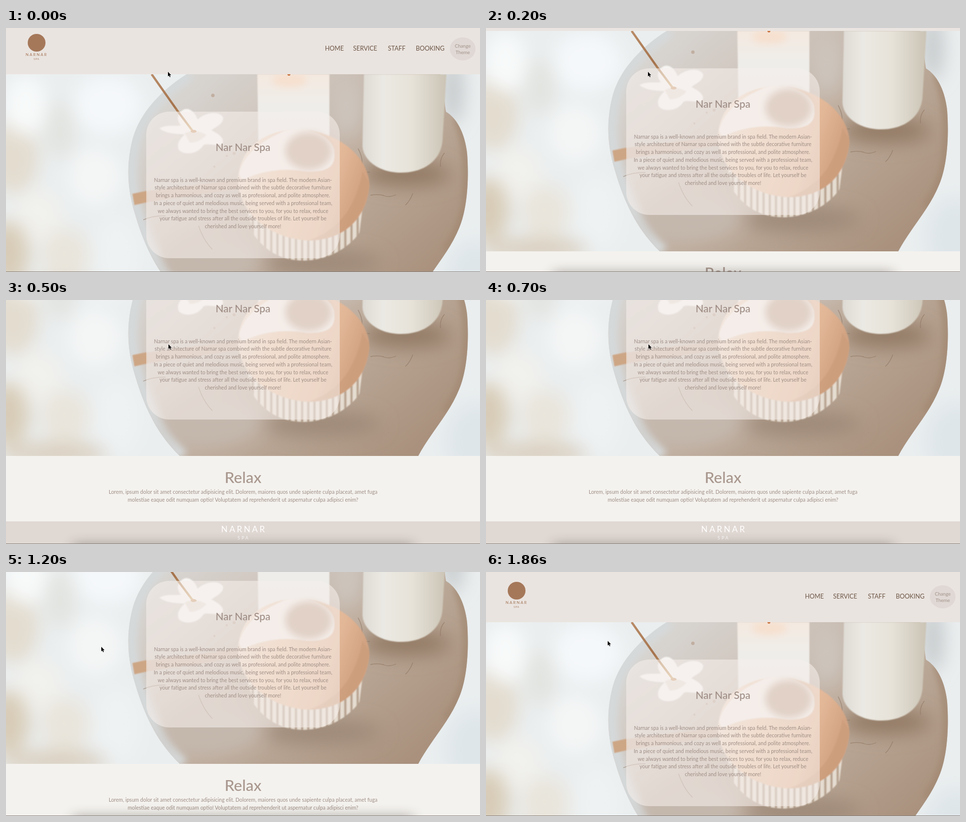
An HTML page that plays this animation: 960 by 496 pixels, repeating every 2020 ms.

```html
<!DOCTYPE html>
<html lang="en">
<head>
<meta charset="utf-8">
<title>Spa</title>
<style>
  html, body { margin: 0; width: 100%; height: 100%; overflow: hidden; background: #f4f2ee; }
  #stage { position: relative; width: 960px; height: 496px; overflow: hidden; font-family: Lato, "Open Sans", sans-serif; }
  #stage * { box-sizing: border-box; margin: 0; }
  #page { position: absolute; left: 0; top: 0; width: 960px; height: 760px; color: #9f8e86; }
  #page > * { position: absolute; white-space: nowrap; }
  header { left: 0; top: 0; width: 960px; height: 102px; background: #eae4e0; }
  header > * { position: absolute; line-height: 20px; }
  nav a { position: absolute; top: 40px; line-height: 20px; font-size: 12.4px; color: #6d5747; }
  .mark { left: 44px; top: 20px; width: 36px; height: 36px; border-radius: 50%; background: #a5785a; }
  .word { color: #a5785a; text-align: center; left: 22px; width: 80px; }
  .theme { left: 899px; top: 27px; width: 52px; height: 47px; border-radius: 50%; background: #e0d8d4; text-align: center; font-size: 9.7px; line-height: 13px; padding-top: 10.5px; color: #a3938b; }
  #hero { left: 0; top: 102px; }
  .card { left: 284px; top: 177.5px; width: 392px; height: 298px; border-radius: 47px; background: rgba(246, 240, 236, .57); }
  .mid { left: 0; width: 960px; text-align: center; }
  .copy { font-size: 10.5px; line-height: 15.7px; }
  h1 { top: 235px; font-size: 21px; line-height: 30px; font-weight: 500; }
  h2 { top: 573px; font-size: 31.5px; line-height: 40px; font-weight: 500; color: #a8978e; }
  footer { left: 0; top: 683px; width: 960px; height: 77px; background: #e0d8d3; }
  .foot { color: #fff; line-height: 20px; }
  #shade { position: absolute; left: 140px; top: 502px; width: 680px; height: 12px; box-shadow: 0 0 24px 4px rgba(50, 42, 38, .45); }
  #edge { position: absolute; left: 0; top: 495px; width: 960px; height: 1px; background: #88807b; }
  #cursor { position: absolute; left: 0; top: 0; overflow: visible; }
</style>
</head>
<body>
<div id="stage">
  <div id="page">
    <svg id="hero" width="960" height="448" viewBox="0 102 960 448">
      <defs>
        <filter id="soft" x="-60%" y="-60%" width="220%" height="220%"><feGaussianBlur stdDeviation="18"/></filter>
        <filter id="haze" x="-30%" y="-30%" width="160%" height="160%"><feGaussianBlur stdDeviation="7"/></filter>
        <filter id="fine"><feGaussianBlur stdDeviation="1"/></filter>
        <linearGradient id="wood" x1="0" y1="0" x2="1" y2=".75">
          <stop offset="0" stop-color="#dcdddb"/><stop offset=".3" stop-color="#d2cac3"/>
          <stop offset=".65" stop-color="#bcaa9a"/><stop offset="1" stop-color="#a9917d"/>
        </linearGradient>
        <linearGradient id="wax">
          <stop offset="0" stop-color="#dedbd4"/><stop offset=".25" stop-color="#ebe9e3"/>
          <stop offset=".6" stop-color="#e6e2d8"/><stop offset="1" stop-color="#cbc4b5"/>
        </linearGradient>
        <linearGradient id="glow" x2="0" y2="1">
          <stop offset="0" stop-color="#f4e9e0"/><stop offset=".35" stop-color="#efedea"/><stop offset="1" stop-color="#ebe9e6"/>
        </linearGradient>
        <linearGradient id="peach" y2=".3">
          <stop offset="0" stop-color="#efe1d6"/><stop offset=".4" stop-color="#eac8ac"/>
          <stop offset=".8" stop-color="#e2b797"/><stop offset="1" stop-color="#d2a382"/>
        </linearGradient>
        <linearGradient id="stick" gradientUnits="userSpaceOnUse" x1="295" y1="102" x2="380" y2="220">
          <stop offset="0" stop-color="#b98c68"/><stop offset=".55" stop-color="#a5734c"/><stop offset="1" stop-color="#d9b57e"/>
        </linearGradient>
        <pattern id="comb" width="12.5" height="80" patternUnits="userSpaceOnUse">
          <rect width="12.5" height="80" fill="#b7a28f"/><rect x="2" width="8" height="80" fill="#e6ddd1"/>
        </pattern>
        <clipPath id="tray"><path id="slab" d="M366 102C318 132 272 178 257 232C243 284 246 330 258 375C276 438 300 500 352 550H835C858 506 898 464 918 414C934 376 938 316 934 264C930 224 914 192 891 178L880 102Z"/></clipPath>
      </defs>
      <rect y="102" width="960" height="448" fill="#eaeeef"/>
      <g filter="url(#soft)">
        <ellipse cx="15" cy="270" rx="50" ry="75" fill="#e3dccf"/>
        <ellipse cx="110" cy="215" rx="32" ry="60" fill="#e2e4e0"/>
        <ellipse cx="40" cy="165" rx="42" ry="60" fill="#f8fafa"/>
        <ellipse cx="205" cy="165" rx="70" ry="60" fill="#f5f8fa"/>
        <ellipse cx="180" cy="310" rx="55" ry="60" fill="#f4f6f6"/>
        <ellipse cx="65" cy="390" rx="50" ry="55" fill="#f1f1ed"/>
        <ellipse cx="5" cy="465" rx="42" ry="65" fill="#d8ccb7"/>
        <ellipse cx="120" cy="470" rx="50" ry="55" fill="#e9e5dc"/>
        <ellipse cx="100" cy="545" rx="110" ry="22" fill="#d9cebd"/>
        <ellipse cx="225" cy="470" rx="50" ry="80" fill="#eef2f3"/>
        <ellipse cx="905" cy="135" rx="22" ry="70" fill="#c6cacc"/>
        <ellipse cx="950" cy="520" rx="60" ry="80" fill="#dfe6ea"/>
      </g>
      <use href="#slab" fill="url(#wood)"/>
      <g clip-path="url(#tray)">
        <path d="M372 102C322 135 276 180 262 235C250 285 252 330 264 375C282 438 306 500 358 550" fill="none" stroke="#d5d9da" stroke-width="26" filter="url(#haze)"/>
        <g filter="url(#soft)">
          <ellipse cx="810" cy="305" rx="90" ry="26" fill="#937a65"/>
          <ellipse cx="640" cy="485" rx="120" ry="26" fill="#9f8a79"/>
          <ellipse cx="420" cy="480" rx="100" ry="50" fill="#c4b8ad"/>
          <ellipse cx="690" cy="170" rx="30" ry="60" fill="#cdc5bd"/>
        </g>
        <path d="M912 190Q940 250 930 360Q926 410 890 460" fill="none" stroke="#a18872" stroke-width="12" filter="url(#haze)"/>
        <g fill="none" stroke="#8c7460" stroke-width="1.3" opacity=".65">
          <path d="M738 348q18 -3 28 1t24 -2M824 344q-6 16 -15 24M713 253q10 18 8 34t16 14M888 262q-10 12 -8 28M278 398q20 -9 45 -8M390 410q10 30 28 48"/>
        </g>
        <g fill="#b59a86" opacity=".6"><circle cx="419" cy="145" r="3.5"/><circle cx="462" cy="263" r="3"/><circle cx="447" cy="268" r="2"/><circle cx="485" cy="260" r="2"/><circle cx="422" cy="290" r="2"/></g>
      </g>
      <path d="M509 102H655V300H512Z" fill="url(#glow)" filter="url(#fine)"/>
      <ellipse cx="574" cy="114" rx="36" ry="14" fill="#f6e0cf" filter="url(#haze)"/>
      <circle cx="573" cy="102" r="3" fill="#c9733f"/>
      <path d="M725 102L722 248C724 278 756 302 800 302C846 302 880 278 884 238L892 102Z" fill="url(#wax)" filter="url(#fine)"/>
      <path d="M354 178C368 164 384 180 388 194C404 178 434 176 440 190C440 204 426 208 416 216C434 224 446 236 436 245C420 247 408 242 400 246C390 264 362 268 350 256C344 242 354 232 362 224C344 224 322 222 311 212C324 204 342 208 354 206C346 196 346 186 354 178Z" fill="#f6f4f2" filter="url(#fine)"/>
      <path d="M362 222q20 -10 44 3q-14 16 -34 16" fill="#e6ded6" filter="url(#fine)"/>
      <path d="M295 102L347 176L380 220" fill="none" stroke="url(#stick)" stroke-width="4.5"/>
      <ellipse cx="380" cy="218" rx="6" ry="3" fill="#cfa278"/>
      <g filter="url(#fine)">
        <path d="M284 340L468 317L474 334L286 362Z" fill="#cfb8a6"/>
        <path d="M256 345L285 339L287 362L260 368Z" fill="#cda685"/>
        <path d="M490 385L503 430C530 466 560 480 602 481C650 480 692 458 716 424L722 375Z" fill="url(#comb)"/>
        <path d="M470 312C474 254 520 216 590 214C670 216 736 268 736 330C730 390 690 440 612 440C530 436 468 380 470 312Z" fill="url(#peach)"/>
        <path d="M736 322C730 390 690 440 612 440C660 424 706 388 722 300Z" fill="#cb9b79" opacity=".55"/>
        <path d="M472 304C482 260 525 234 562 218C600 206 655 222 664 254C670 292 650 300 610 300C566 292 520 296 478 318Z" fill="#f2ebe6"/>
      </g>
      <ellipse cx="613" cy="258" rx="47" ry="38" fill="#c6ab97" filter="url(#haze)"/>
    </svg>
    <header>
      <i class="mark"></i>
      <span class="word" style="top:52px;font-size:8px;letter-spacing:1.9px">NARNAR</span>
      <span class="word" style="top:61px;font-size:5px;letter-spacing:1px">SPA</span>
      <nav style="left:0;top:0">
        <a style="left:646px">HOME</a><a style="left:703px">SERVICE</a><a style="left:773.5px">STAFF</a><a style="left:830px">BOOKING</a>
      </nav>
      <div class="theme">Change<br>Theme</div>
    </header>
    <div class="card"></div>
    <h1 class="mid">Nar Nar Spa</h1>
    <p class="mid copy" style="top:309.7px">Narnar spa is a well-known and premium brand in spa field. The modern Asian-<br>style architecture of Narnar spa combined with the subtle decorative furniture<br>brings a harmonious, and cozy as well as professional, and polite atmosphere.<br>In a piece of quiet and melodious music, being served with a professional team,<br>we always wanted to bring the best services to you, for you to relax, reduce<br>your fatigue and stress after all the outside troubles of life. Let yourself be<br>cherished and love yourself more!</p>
    <h2 class="mid">Relax</h2>
    <p class="mid copy" style="top:616px">Lorem, ipsum dolor sit amet consectetur adipisicing elit. Dolorem, maiores quos unde sapiente culpa placeat, amet fuga<br>molestiae eaque odit numquam optio! Voluptatem ad reprehenderit ut aspernatur culpa adipisci enim?</p>
    <footer></footer>
    <p class="mid foot" style="top:689px;font-size:17px;letter-spacing:3.6px;text-indent:3.6px">NARNAR</p>
    <p class="mid foot" style="top:707px;font-size:9px;letter-spacing:3px;text-indent:3px">SPA</p>
  </div>
  <div id="shade"></div>
  <div id="edge"></div>
  <svg id="cursor" width="8" height="12"><path d="M0 0V9.4L2.1 7.5L3.7 11L5.2 10.3L3.7 7H6.6Z" fill="#000" stroke="#fff" stroke-width=".8" paint-order="stroke"/></svg>
</div>
<script>
  const LOOP = 2020;
  // time, scroll, cursor x, cursor y
  const steps = [
    [0, 8, 328, 89], [100, 38, 328, 89], [200, 96, 328, 89], [300, 224, 329, 90],
    [400, 232, 329, 90], [500, 233, 329, 90], [800, 233, 310, 98], [900, 233, 268, 118],
    [1000, 233, 222, 139], [1100, 233, 193, 152], [1200, 160, 193, 152],
    [1300, 0, 193, 152], [1860, 0, 246.5, 140], [LOOP, 0, 246.5, 140]
  ];
  const play = (id, pose) => document.getElementById(id).animate(
    steps.map(([t, ...v]) => ({ offset: t / LOOP, easing: 'steps(1, end)', ...pose(...v) })),
    { duration: LOOP, iterations: Infinity }
  );
  play('page', y => ({ transform: `translateY(${-y}px)` }));
  play('cursor', (_, x, y) => ({ transform: `translate(${x}px, ${y}px)` }));
  play('shade', y => ({ opacity: y > 90 ? 1 : 0 }));
</script>
</body>
</html>
```
